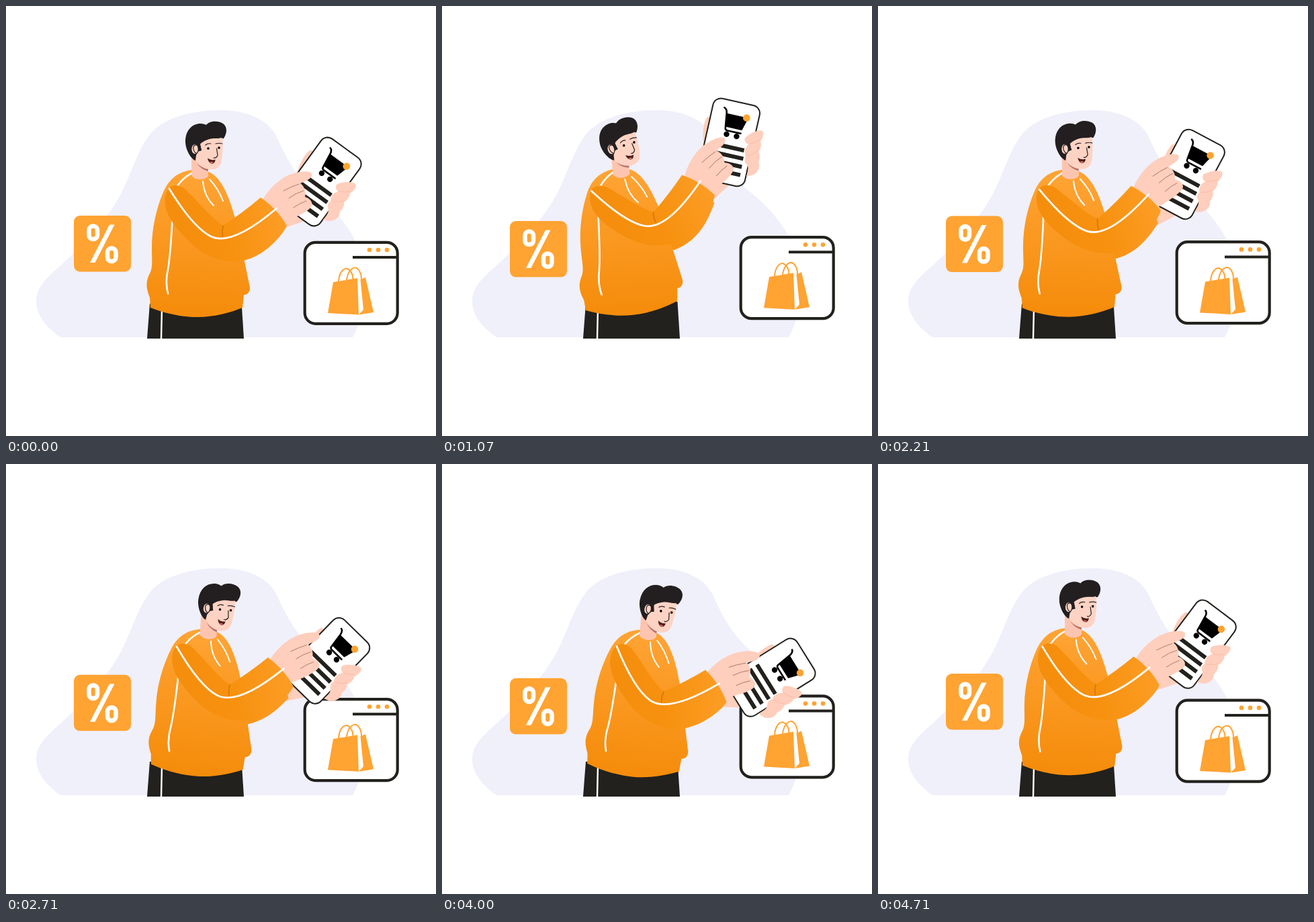
Animation of 640x640 px, one loop 4.78 s. Source, as an HTML page:

```html
<!DOCTYPE html>
<html lang="en">
<head>
<meta charset="utf-8">
<title>Mobile shopping</title>
<style>
  html, body { margin: 0; width: 100%; height: 100%; overflow: hidden; background: #fff; }
  svg { display: block; width: 100vw; height: 100vh; }
  .line { fill: none; stroke-linecap: round; stroke-linejoin: round; }
  .white { stroke: #fff; }
  .ink { stroke: #22211d; }
  .skin { fill: #ffcebc; }
  .accent { fill: #ffa332; }
</style>
</head>
<body>
<svg viewBox="0 0 640 640">
  <defs>
    <linearGradient id="cloth" gradientUnits="userSpaceOnUse" x1="285" y1="245" x2="275" y2="455">
      <stop offset="0" stop-color="#ffa435"/><stop offset="1" stop-color="#f58c0b"/>
    </linearGradient>
    <linearGradient id="sleeve" gradientUnits="userSpaceOnUse" x1="265" y1="330" x2="410" y2="300">
      <stop offset="0" stop-color="#f58e0d"/><stop offset=".4" stop-color="#f7910f"/><stop offset="1" stop-color="#fc9d25"/>
    </linearGradient>
  </defs>

  <path fill="#f0f0fb" d="M81 493C60 478 45 460 45 440C45 410 75 395 100 368C125 342 148 320 168 285C185 255 195 215 215 190C235 165 280 155 320 155C360 155 390 170 402 193C418 228 430 250 455 274C483 295 513 328 526 364C540 410 535 460 516 493Z"/>

  <g id="percent">
    <rect class="accent" x="101" y="312" width="85" height="83.5" rx="9"/>
    <path fill="#fff" d="M154 325.500H161.500L132.500 382H125Z"/>
    <g class="line white" stroke-width="6.6">
      <rect x="123.500" y="327.500" width="12.500" height="19.500" rx="6"/>
      <rect x="151" y="360.500" width="12.500" height="19.500" rx="6"/>
    </g>
  </g>

  <g id="window">
    <rect class="ink" x="444.700" y="351.800" width="138" height="121" rx="16" fill="#fff" stroke-width="4.2"/>
    <path class="ink" d="M516 374H582" stroke-width="4"/>
    <g class="accent">
      <circle cx="541" cy="363" r="3.3"/><circle cx="554" cy="363" r="3.3"/><circle cx="567" cy="363" r="3.3"/>
      <path d="M487 411L523 405L525 459.500L479 457Z"/>
      <path d="M527.500 407L535 404L547 456L525 459.500L532 452Z"/>
    </g>
    <path class="line" stroke="#ffa332" stroke-width="2" d="M495 410C496 394 505 387 511 393C515 397 517 403 516 408M507 407C510 390 520 386 525 393C528 397 529 402 529 406"/>
  </g>

  <path fill="#22211d" d="M214 443L210 495H354L350.500 440Z"/>
  <path class="white" stroke-width="2.4" d="M232 450L231 495"/>

  <g id="phone">
    <path class="skin" d="M433 250C436 235 444 221 452 215C456 213 458 216 455 224L438 250Z"/>
    <path class="skin" d="M404 334L441 321L462 300L425 295Z"/>
    <g transform="translate(468.5 261.500) rotate(36)">
      <rect class="ink" x="-35.500" y="-61.500" width="71" height="123" rx="12" fill="#fff" stroke-width="2"/>
      <path stroke="#22211d" stroke-width="6" d="M-27 7H24.500M-27 19.300H26M-27 31.600H26.500M-27 44H27"/>
      <g stroke="#000" class="line">
        <path stroke-width="2.6" d="M-18 -49Q-14 -48 -13 -42L-10 -20Q-10 -16.500 -6 -16.500H14"/>
        <path fill="#000" stroke-width="2" d="M-12 -40.500H19L14 -22.500H-9.500Z"/>
      </g>
      <circle cx="-6.300" cy="-11" r="4.200"/><circle cx="9" cy="-11" r="4.200"/>
      <circle class="accent" cx="17.500" cy="-41" r="5.300"/>
    </g>
    <path class="skin" d="M493 265C502 261 518 261 521 266C521 272 516 276 512 279C512 284 508 289 503 292C504 298 500 303 497 306C497 315 488 321 480 320L472 318C478 312 480 308 480 303C478 299 478 294 483 291C483 284 486 279 494 276C490 272 490 268 493 265Z"/>
    <path class="line" stroke="#f7b9a4" stroke-width=".8" d="M496 276Q504 278 512 276M485 291Q495 293 503 290"/>
  </g>

  <path id="rearSleeve" fill="url(#sleeve)" d="M300 330L392 306L407 310L417 329C398 357 375 378 340 381Z"/>

  <g id="body">
    <path fill="url(#cloth)" d="M276 244C255 247 243 258 235 275C224 300 217 330 217 360C217 380 219 390 213 400C206 415 211 425 214 434L215 449C235 457 260 463 285 463C310 463 335 456 352 449L354 430C361 430 365 423 362 414L355 380L341 316C334 290 322 255 302 247Z"/>
    <path class="line white" stroke-width="2.600" d="M276 249Q263 256 255 268M248 308C246 350 244 375 241 392C237 410 239 420 241 428"/>
    <path class="line white" stroke-width="2" d="M293 261Q295 283 309 297M303 258Q316 272 323 290"/>
    <path fill="#fdc5b0" d="M276 222V252C280 260 297 260 301 253V236Z"/>
    <g id="head">
      <path fill="#ffd3c4" d="M282 198L321 190C323 205 323 216 321 229C320 241 311 245 301 243C291 240 284 233 279 226Z"/>
      <path fill="#b5736c" d="M284 234Q291 241 301 243L301 246Q290 243 284 234Z"/>
      <path fill="#231f20" d="M282 230C275 228 267 213 267 202C267 185 277 175 290 175C293 175 296 176 298 177C303 171 315 170 323 175C330 180 329 190 324 197Q322 198 321 196C315 198 309 196 303 198C296 200 291 203 288.500 206L291 215L287 216L283 222Z"/>
      <ellipse cx="281" cy="213" rx="4.700" ry="7" fill="#ffd3c4"/>
      <path class="line" stroke="#231f20" stroke-width="1.200" d="M284 207Q278 206 279 213Q280 218 283 219M297 207Q300 204 305 205M312 205Q317 203.500 322 205M313.500 212L315 222Q313 227 309 226"/>
      <path fill="#231f20" d="M285 205L289 205L291 215L287 216Z"/>
      <circle cx="301" cy="212" r="1.800"/><circle cx="317" cy="211" r="1.800"/>
      <path fill="#4d1f1c" d="M300 226.500Q306 230.500 311.500 228.500C311.500 236.500 302 237.500 300 226.500Z"/>
      <path fill="#e0695c" d="M303 232.500Q306 231 309 233Q306 235.500 303 232.500Z"/>
    </g>
  </g>

  <g id="arm">
    <path class="skin" d="M381 290C392 270 410 255 425 250C436 246 448 245 453 247.500C458 251 454 256.500 448 259.500L438 264C444 268 447 276 445 284C453 287 457 292 455 298C450 306 432 314 414 322Z"/>
    <path class="line" stroke="#8d5a4f" stroke-width=".7" d="M413 275Q424 269 436 265M421 286Q432 278 443 275M428 300Q438 293 447 290"/>
    <path fill="url(#sleeve)" d="M252 267C241 267 235 280 237 297C240 315 254 333 275 353C293 369 312 379 340 380C375 380 408 348 418 327C410 313 398 298 379 285Q352 308 323 327C303 313 285 290 268 274C263 269 258 267 252 267Z"/>
    <path class="line" stroke="#d97a06" stroke-width="1.800" d="M323 327Q321 335 322.500 343"/>
    <path class="line white" stroke-width="2.700" d="M243 272C262 303 283 332 305 343C330 355 370 329 403 301"/>
  </g>
</svg>

<script>
const LOOP = 4780, STEP = LOOP / 67;
const times = [0, 570, 1175, 1640, 2210, 3290, 4000, 4710];
const tracks = {
  lean:   [0, -4.1, -6, -5.5, -0.6, 6.9, 4.9, 0.5],
  reach:  [0, -9.2, -16.4, -16.3, -7.7, 10.1, 9.5, 0.7],
  phoneX: [0, -25.5, -43, -39, -8.7, 24, 20.5, 3.7],
  phoneY: [0, -39, -60.5, -52.5, -11.2, 70.5, 56, 6.5],
  tilt:   [0, -14, -24.5, -23, -8, 24, 22, 1]
};

// Periodic cubic through the key poses.
function sample(values, t) {
  const n = times.length;
  const time = i => times[(i + n) % n] + LOOP * Math.floor(i / n);
  const value = i => values[(i + n) % n];
  const slope = i => (value(i + 1) - value(i - 1)) / (time(i + 1) - time(i - 1));
  const i = times.findLastIndex(k => k <= t);
  const span = time(i + 1) - time(i), u = (t - time(i)) / span, v = 1 - u;
  return value(i) * v * v * (1 + 2 * u) + value(i + 1) * u * u * (3 - 2 * u)
    + span * u * v * (slope(i) * v - slope(i + 1) * u);
}

const place = (id, transform) => document.getElementById(id).setAttribute("transform", transform);

function draw(now) {
  const t = Math.floor((now % LOOP + 9) / STEP) % 67 * STEP;
  const pose = {};
  for (const name in tracks) pose[name] = sample(tracks[name], t);
  const { lean, reach, phoneX, phoneY, tilt } = pose;

  const bob = 8.1 * (1 - Math.abs(Math.cos(2 * Math.PI * t / LOOP)) ** 2.8);
  place("percent", `translate(0 ${bob})`);
  place("window", `translate(0 ${-bob * 0.95})`);

  const leanFromHip = `rotate(${lean} 254 462)`;
  place("body", leanFromHip);
  place("head", `rotate(${lean * 1.35} 289 245)`);
  place("arm", `${leanFromHip} rotate(${reach - lean} 250 280)`);
  place("rearSleeve", `${leanFromHip} rotate(${phoneY * 0.26 - lean} 300 290)`);
  place("phone", `translate(${phoneX} ${phoneY}) rotate(${tilt} 468.5 261.5)`);
}

const start = performance.now();
function tick() {
  draw(performance.now() - start);
  requestAnimationFrame(tick);
}
tick();
</script>
</body>
</html>
```
